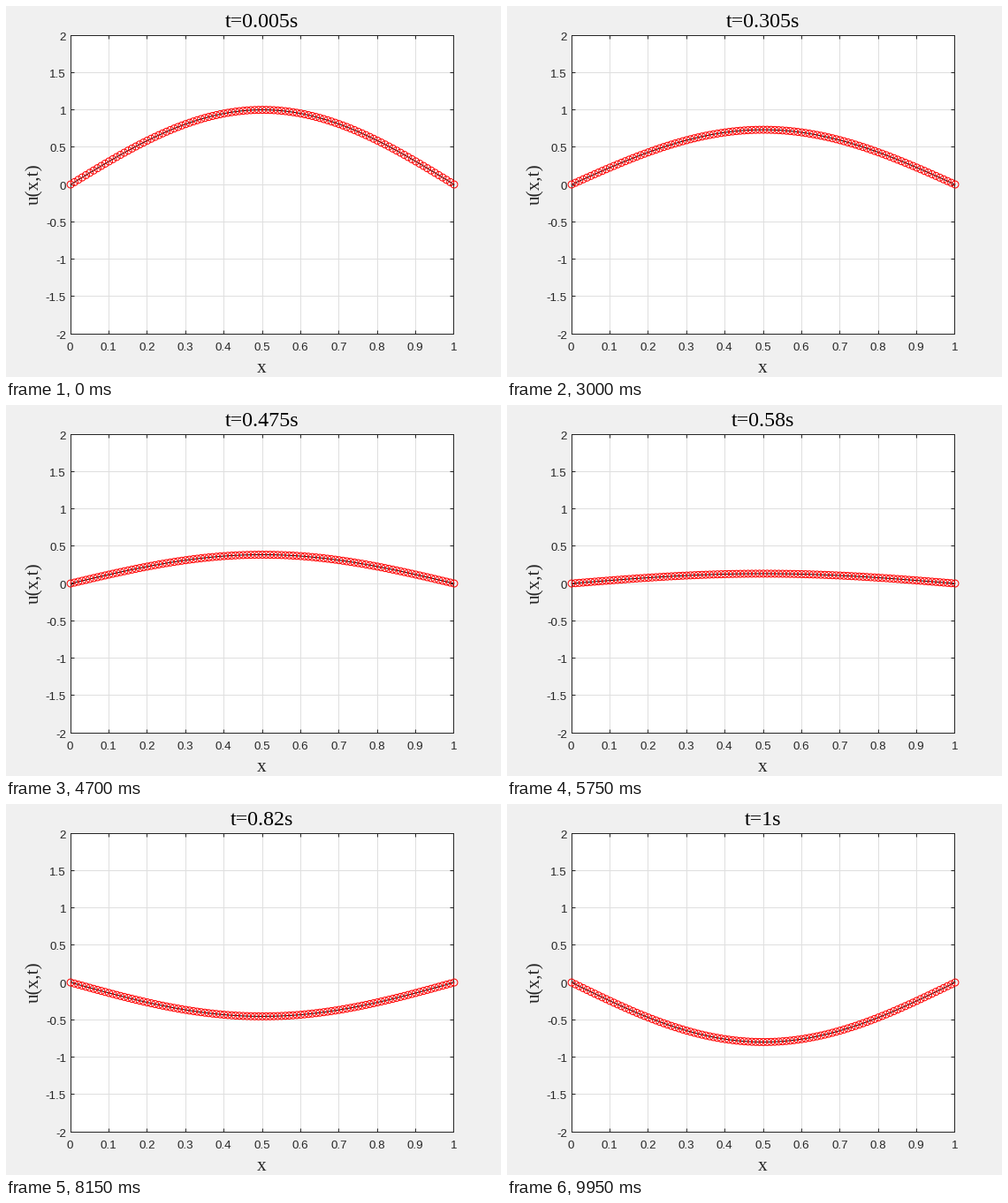
These frames come from a looping animation (560x420 px, 10000 ms). A matplotlib script:

```python
import numpy as np
import matplotlib.pyplot as plt
from matplotlib.animation import FuncAnimation
from matplotlib.collections import LineCollection
from matplotlib.transforms import Affine2D

W, H = 560, 420
PX = 0.72                      # one pixel in points at 100 dpi
LEFT, RIGHT = 72.6, 506.45
TOP, BOTTOM = 32.55, 370.55
X_UNIT = RIGHT - LEFT          # pixels per unit of x
Y_UNIT = (BOTTOM - TOP) / 4    # pixels per unit of u
MID = (LEFT + RIGHT) / 2
INK = "#262626"
SERIF, SANS = "Liberation Serif", "Liberation Sans"

FRAMES, INTERVAL = 200, 50
DT = 0.005
SPEED = 0.8
RADIUS = 4

fig = plt.figure(figsize=(W / 100, H / 100), dpi=100, facecolor="#f0f0f0")
ax = fig.add_axes([LEFT / W, 1 - BOTTOM / H, X_UNIT / W, (BOTTOM - TOP) / H])
ax.set(xlim=(0, 1), ylim=(-2, 2))
ax.set_xticks(np.linspace(0, 1, 11))
ax.set_yticks(np.linspace(-2, 2, 9))
ax.set_axisbelow(True)
ax.grid(color="#dfdfdf", lw=PX)
ax.tick_params(direction="in", length=4 * PX, width=PX, color=INK,
               top=True, right=True, labelbottom=False, labelleft=False)
for spine in ax.spines.values():
    spine.set(color=INK, linewidth=PX)


def put(x, y, text, size, font=SANS, color=INK, **kw):
    """Place text by its baseline, in pixels from the top left corner."""
    opts = dict(ha="center", va="baseline")
    opts.update(kw)
    return fig.text(x / W, 1 - y / H, text, fontsize=size * PX,
                    family=font, color=color, **opts)


for v in np.linspace(0, 1, 11):
    put(LEFT + v * X_UNIT, 390, f"{v:g}", 13.33)
for v in np.linspace(-2, 2, 9):
    put(68, 207.7 - v * Y_UNIT, f"{v:g}", 13.33, ha="right")

put(MID, 415, "x", 21.33, SERIF)
put(42, 202, "u(x,t)", 21.33, SERIF, rotation=90, ha="right", va="center")
title = put(MID, 24, "", 24, SERIF, "black")

x = np.linspace(0, 1, 101)
shape = np.sin(np.pi * x)
turn = np.linspace(0, 2 * np.pi, 33)
ring = np.column_stack([np.cos(turn) * RADIUS / X_UNIT,
                        np.sin(turn) * RADIUS / Y_UNIT])

# The axes lines snap to pixel centres; the curve is moved to match them.
shifted = ax.transData + Affine2D().translate(0.5, -0.5)
curve, = ax.plot(x, shape, color="black", lw=PX, clip_on=False, zorder=4,
                 transform=shifted)
rings = LineCollection([], colors="red", linewidths=PX, clip_on=False, zorder=5,
                       transform=shifted)
ax.add_collection(rings, autolim=False)


def update(i):
    t = (i + 1) * DT
    # The scheme starts at rest with two equal steps: a lag of 1.5 steps.
    u = np.cos(np.pi * SPEED * (t - 1.5 * DT)) * shape
    centers = np.column_stack([x, u])
    curve.set_ydata(u)
    rings.set_segments(centers[:, None, :] + ring[None, :, :])
    title.set_text(f"t={t:g}s")
    return curve, rings, title


anim = FuncAnimation(fig, update, frames=FRAMES, interval=INTERVAL,
                     init_func=lambda: update(0), repeat=True, repeat_delay=0)
plt.show()
```
